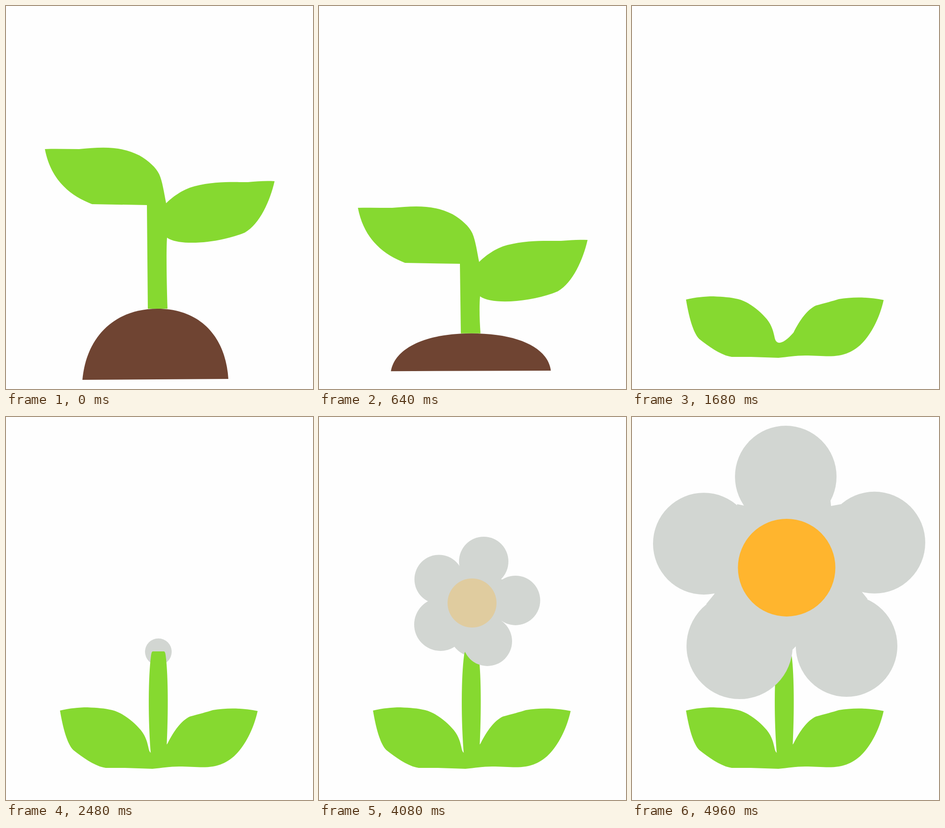
An HTML page that plays this animation: 671 px wide and 835 px high, repeating every 5.76 s.

```html
<!DOCTYPE html>
<html lang="en">
<head>
<meta charset="utf-8">
<title>Growing flower</title>
<style>
  html, body { margin: 0; width: 100%; height: 100%; overflow: hidden; background: #fefefe; }
  svg { display: block; width: 100vw; height: 100vh; }
  .green { fill: #86d930; }
  .soil { fill: #6f4432; }
  .petal { fill: #d2d6d2; }
  .disk { fill: #ffb52e; }
</style>
</head>
<body>
<svg viewBox="0 0 671 835">
  <ellipse id="bud" class="petal"/>
  <path id="leaves" class="green"/>
  <path id="mound" class="soil"/>
  <path id="stem" class="green" d="M317 740C310 660 311 565 317 520Q318 511 321 511L345 511Q348 511 349 520C355 565 355 660 350 740Z"/>
  <g id="flower">
    <path id="body" class="petal" d="M230 190L244 193L434 183L435 194L457 190L503 382L515 397L358 500L351 507L162 408L180 386Z"/>
    <g id="petals"></g>
    <circle id="disk" class="disk"/>
  </g>
</svg>
<script>
const LOOP = 5760, STEP = 80;
const $ = id => document.getElementById(id);
const lerp = (a, b, k) => a + (b - a) * k;

// Piecewise linear track: rows of [time, ...values]
function track(rows, t) {
  if (t <= rows[0][0]) return rows[0].slice(1);
  for (let i = 1; i < rows.length; i++) {
    const a = rows[i - 1], b = rows[i];
    if (t <= b[0]) {
      const k = (t - a[0]) / (b[0] - a[0]);
      return a.slice(1).map((v, j) => lerp(v, b[j + 1], k));
    }
  }
  return rows[rows.length - 1].slice(1);
}

function set(el, attrs) {
  for (const name in attrs) el.setAttribute(name, attrs[name]);
}

// Two poses of the leaves with matching commands
const SPROUT = `M85 312C110 311 135 312 160 312C205 308 250 304 292 326
  C312 338 328 352 335 367C342 383 345 405 350 430C350 430 350 430 350 430
  C362 418 385 400 412 393C455 382 495 384 529 384C550 382 568 381 587 382
  C577 425 555 475 522 494C470 516 380 525 352 505C350 530 351 600 353 660
  L310 660L308 434L188 432C166 423 144 412 126 393C107 374 92 348 85 312Z`;
const ROSETTE = `M118 640C140 635 158 633 178 633C200 634 215 635 232 639
  C255 645 278 663 295 683C306 697 309 710 312 724C316 740 330 738 353 712
  C367 684 383 662 402 653C420 648 440 643 452 639C482 634 515 634 550 641
  C540 685 520 720 498 740C460 772 430 762 378 762C360 762 340 765 320 767
  L290 766L260 765L218 765C196 762 170 744 147 726C133 712 124 675 118 640Z`;
const numbers = d => d.match(/\d+/g).map(Number);
const sprout = numbers(SPROUT), rosette = numbers(ROSETTE);

const SINK = [[0, 0], [640, .471], [960, .7206], [1280, .942], [1360, 1]];
const MORPH = [[1360, 0], [1680, 1]];
const STEM = [[1680, 0], [2160, 1]];
// rx, ry, cx, cy
const BUD = [[2080, 0, 0, 333, 511], [2560, 35, 35, 333, 512], [3200, 54.5, 70, 332, 466],
  [3280, 54.5, 70.5, 332, 465], [4080, 54.5, 70.5, 334, 450.5], [4960, 54.5, 70.5, 337, 418]];
// bloom, cx, cy
const BLOOM = [[3280, -.635, 332, 462], [3840, -.19, 332, 432], [4080, 0, 337, 402],
  [4480, .514, 340, 367], [4960, 1, 345.4, 335.6]];
// angle, distance and radius of each petal: half open, then open
const PETALS = [
  [14.8, 90, 54, -2.6, 205.8, 111],
  [88.7, 92.5, 54, 71.5, 194.6, 111],
  [160.4, 92.3, 54, 142.9, 204.9, 111],
  [234.8, 87.5, 57.5, 214, 197.2, 116],
  [302.7, 89, 53.5, 287.5, 197.6, 111]
];
const petals = PETALS.map(() => {
  const c = document.createElementNS("http://www.w3.org/2000/svg", "circle");
  c.setAttribute("class", "petal");
  return $("petals").appendChild(c);
});

function drawSprout(t) {
  const [p] = track(SINK, t), [m] = track(MORPH, t);
  const shift = 272 * p, base = 660 + 114 * p;
  // Leaves sink as one; only the stem below them is squashed
  const sinkY = y => y <= 525 ? y + shift : lerp(525 + shift, base, (y - 525) / 135);
  let i = 0;
  $("leaves").setAttribute("d", SPROUT.replace(/\d+/g, () => {
    const from = i % 2 ? sinkY(sprout[i]) : sprout[i];
    return lerp(from, rosette[i++], m).toFixed(2);
  }));

  const l = 167 - 21 * p, r = 486 + 44 * p, mid = 331 + 3 * p;
  const bottom = 815 - 40 * p, h = bottom - base, right = bottom - 2 * (1 - p);
  $("mound").setAttribute("d", `M${l} ${bottom}
    C${l + 9} ${base + h * .37} ${lerp(l, mid, .45)} ${base} ${mid} ${base}
    C${lerp(mid, r, .6)} ${base} ${r - 6} ${base + h * .39} ${r} ${right}Z`);
  $("mound").style.display = p < 1 ? "" : "none";
}

function drawStem(t) {
  const [k] = track(STEM, t);
  set($("stem"), { transform: `translate(0 ${740 * (1 - k)}) scale(1 ${k})` });
  $("stem").style.display = k > 0 ? "" : "none";
  const [rx, ry, cx, cy] = track(BUD, t);
  set($("bud"), { rx, ry, cx, cy });
}

function drawFlower(t) {
  $("flower").style.display = t > 3280 ? "" : "none";
  const [k, cx, cy] = track(BLOOM, t);
  PETALS.forEach((row, i) => {
    const [angle, dist, r] = [0, 1, 2].map(j => lerp(row[j], row[j + 3], k));
    const a = angle * Math.PI / 180;
    set(petals[i], { cx: cx + dist * Math.sin(a), cy: cy - dist * Math.cos(a), r });
  });
  set($("body"), {
    transform: `translate(${cx} ${cy}) rotate(${17.5 * (1 - k)}) scale(${lerp(.45, 1, k)}) translate(-345.4 -335.6)`
  });
  set($("disk"), {
    cx: cx + lerp(-2.5, -7.4, k),
    cy: cy + lerp(3.5, -7.2, k),
    r: lerp(53.5, 106.5, k),
    opacity: Math.max(0, lerp(.31, 1, k))
  });
}

function draw(now) {
  const t = Math.floor((now % LOOP) / STEP) * STEP;
  drawSprout(t);
  drawStem(t);
  drawFlower(t);
}

const start = performance.now();
function tick() {
  draw(performance.now() - start);
  requestAnimationFrame(tick);
}
tick();
</script>
</body>
</html>
```
